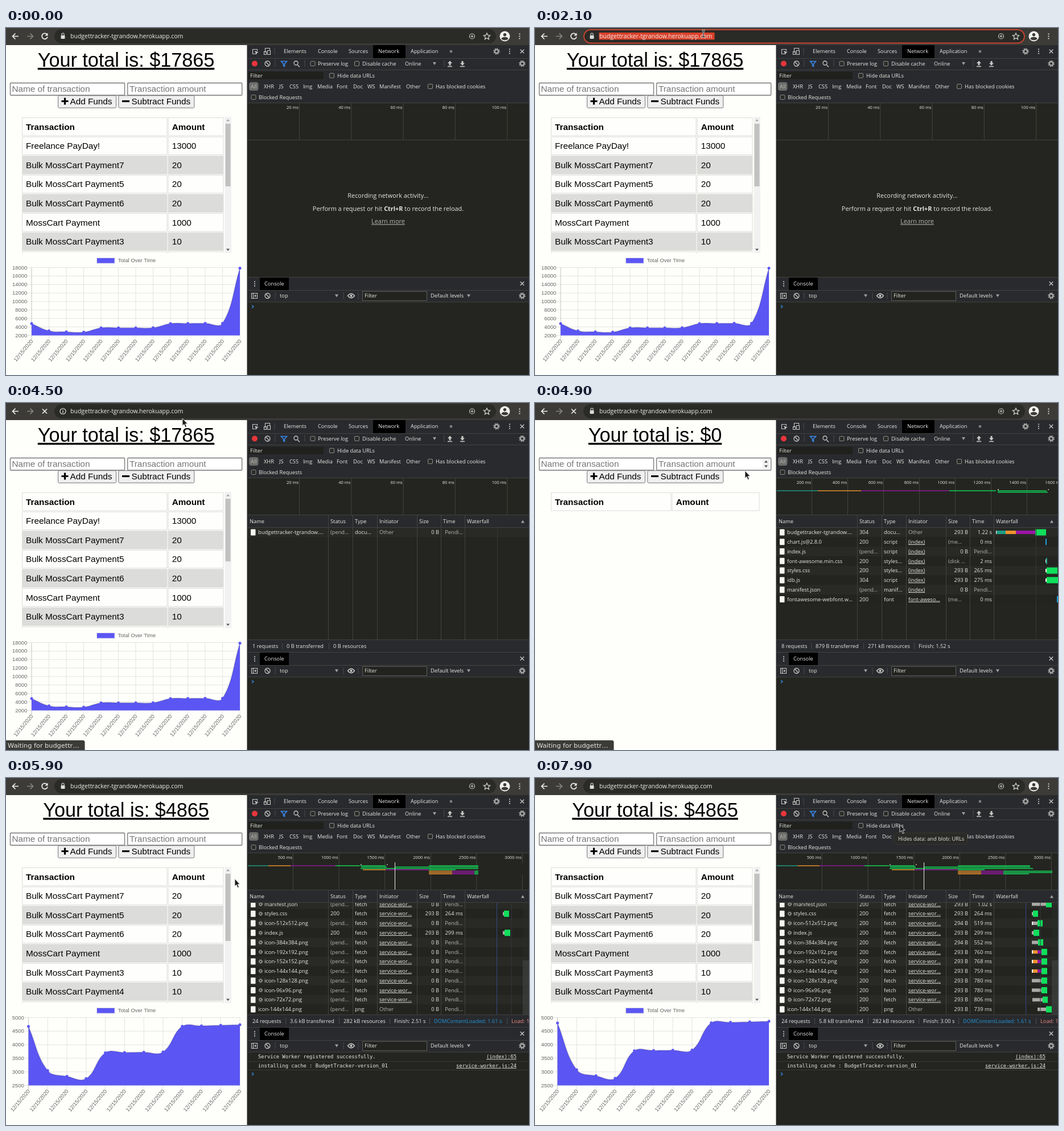
Recreate the animation shown at these times as an HTML page. Size 919 px wide and 609 px high, loop 8 s.

```html
<!DOCTYPE html>
<html lang="en">
<head>
<meta charset="utf-8">
<title>Budget tracker reload</title>
<style>
html, body { margin: 0; width: 100%; height: 100%; overflow: hidden; background: #242520; }
svg { display: block; width: 100%; height: 100%; }
text { font: 500 9.3px "Open Sans", "Noto Sans", sans-serif; fill: #e6e7e3; white-space: pre; }
.url { font-size: 10.5px; fill: #eee; }
.msg { font-size: 10.9px; text-anchor: middle; }
.tick { font-size: 7.5px; text-anchor: end; }
.dim { fill: #b4b5b1; }
.end { text-anchor: end; }
.link { text-decoration: underline; }
.mono { font: 8.8px "DejaVu Sans Mono", monospace; }
.wait { font: 11.3px "DejaVu Sans", sans-serif; }
.page { font: 15.3px "Liberation Sans", Arial, sans-serif; fill: #000; }
.hint { fill: #757575; }
.bold { font-weight: bold; }
.total { font-size: 34.2px; text-anchor: middle; text-decoration: underline; }
.axis { font: 9.5px "Liberation Sans", Arial, sans-serif; fill: #666; text-anchor: end; }
</style>
</head>
<body>
<svg viewBox="0 0 919 609" preserveAspectRatio="none">
  <defs>
    <clipPath id="rows"><path d="M424 218.500H919V415H424z"/></clipPath>
    <clipPath id="list"><path d="M0 150H397V395H0z"/></clipPath>
  </defs>
  <g id="base"></g>
  <g id="live"></g>
</svg>
<script>
const LOOP = 8000, STEP = 100;
const HOST = 'budgettracker-tgrandow';
const SHOP = 'MossCart';
const INK = '#c9cac6', EDGE = '#42433f', BLUE = '#5b56f3';
const HUES = { t: '#1d9e86', o: '#ef932d', p: '#9a16a6', g: '#10df5c', b: '#209fdf', a: '#a9aaa6', w: '#f4f4f0' };

const text = (x, mid, s, cls = '', size = 9.4) =>
  `<text x="${x}" y="${mid + size * .35}" class="${cls}">${s}</text>`;
const rect = (x, y, w, h, fill, more = '') =>
  `<rect x="${x}" y="${y}" width="${w}" height="${h}" fill="${fill}" ${more}/>`;
const line = (d, color = INK, w = 1.3, more = '') =>
  `<path d="${d}" fill="none" stroke="${color}" stroke-width="${w}" ${more}/>`;
const shape = (d, fill = INK) => `<path d="${d}" fill="${fill}"/>`;
const ring = (x, y, r, color = INK, w = 1.3, more = '') =>
  `<circle cx="${x}" cy="${y}" r="${r}" fill="none" stroke="${color}" stroke-width="${w}" ${more}/>`;
const dot = (x, y, r, fill = INK) => `<circle cx="${x}" cy="${y}" r="${r}" fill="${fill}"/>`;
const each = (list, fn) => list.map(fn).join('');

const gear = (x, y) => ring(x, y, 3.2, '#a5a6a4', 2.4) + ring(x, y, 5, '#a5a6a4', 1.5, 'stroke-dasharray="2 1.93"');
const dots = (x, y, gap, c) => each([-1, 0, 1], k => dot(x, y + k * gap, 1.1, c));
const cross = (x, y, r, c, w) => line(`M${x - r} ${y - r}l${2 * r} ${2 * r}m0 ${-2 * r}l${-2 * r} ${2 * r}`, c, w);
const stop = (x, y) => ring(x, y, 4.5) + line(`M${x - 3} ${y - 3}l6 6`);
const caret = (x, y) => shape(`M${x - 3} ${y - 2.5}h6l-3 5z`, '#a0a19f');
const box = (x, y) => rect(x - 4, y - 4, 8, 8, '#2b2c29', 'rx="1.5" stroke="#8d8e8a"');
const bars = ys => each(ys, ([x, y]) => line(`M${x} ${y - 6}v12`, '#4a4b4d', 1));

// "start c1end c2end ...": a letter picks the colour, a capital makes it tall
function segs(y, spec, thin, tall) {
  let [x, ...parts] = spec.split(' ');
  return each(parts, p => {
    const c = p[0], to = +p.slice(1), h = c < 'a' ? tall : thin, from = +x;
    x = to;
    return c === '_' ? '' : rect(from, y - h / 2, to - from, h, HUES[c.toLowerCase()]);
  });
}

function browser() {
  return rect(0, 0, 919, 30, '#3c3b37') + rect(85, 2, 776, 25, '#2a2a27', 'rx="12.500"')
    + line('M22 14.500H12M16.500 9.500l-5 5l5 5', '#eee', 1.7)
    + line('M37 14.500H47M42.500 9.500l5 5l-5 5', '#85857f', 1.7)
    + ring(819, 14.5, 4.5, '#c9c9c5', 1.2) + line('M816.500 14.500h5m-2.500-2.500v5', '#c9c9c5', 1.2)
    + line('M845 9l1.700 3.700 4 .4-3 2.700.9 4-3.600-2.100-3.600 2.100.9-4-3-2.700 4-.4z', '#d5d5d1', 1.2)
    + dot(876.5, 14.5, 9, '#f1f1ef') + dot(876.5, 11.8, 2.7, '#3c3b37')
    + shape('M870.500 19.500q0-3.800 6-3.800t6 3.800q-6 4-12 0z', '#3c3b37') + dots(902.5, 14.5, 4, '#eee');
}

function devtools() {
  const tabs = [[488, 'Elements'], [548, 'Console'], [602, 'Sources'], [654, 'Network'], [711, 'Application']];
  const types = [[453, 'XHR'], [480, 'JS'], [498, 'CSS'], [522, 'Img'], [547, 'Media'], [581, 'Font'],
    [610, 'Doc'], [635, 'WS'], [656, 'Manifest'], [703, 'Other']];
  return rect(423, 30, 496, 579, '#242520') + rect(424, 30, 495, 101, '#292a2d')
    + rect(645, 30, 57, 23, '#000') + line('M424 53.500H919M424 73.500H919M424 131.500H919M424 196.500H919', EDGE, 1)
    + line('M440 45.500h-6.500v-8h8v3', INK, 1.1) + shape('M437 40l7 2.700-3 1-1 3z')
    + line('M455.500 43v-7.500h8v3M453.500 41.500h4v5h-4zM459.500 39.500h5v7h-5z', INK, 1.1)
    + bars([[472, 41], [473, 62], [525, 62], [770, 62]])
    + each(tabs, ([x, s]) => text(x, 41, s)) + text(782, 40, '»', 'msg', 11)
    + gear(862, 41) + dots(885, 41, 3.7) + cross(907, 41, 3.3)
    + dot(437, 62.5, 5, '#e8363c') + stop(459.5, 62.5)
    + line('M483.500 58.500h10l-4 4.500v4.500l-2-1v-3.500z', '#3b86e8', 1.6)
    + ring(509.5, 61.5, 3.5) + line('M512 64.500l4 4')
    + box(539, 62.5) + text(548, 62.5, 'Preserve log') + box(616.5, 62.5) + text(626, 62.5, 'Disable cache')
    + text(701, 62.5, 'Online') + caret(753, 62.5)
    + shape('M780 57.500l4 4.500h-2.500v3.500h-3v-3.500h-2.500z') + shape('M802 66l4-4.500h-2.500v-3.500h-3v3.500h-2.500z')
    + line('M776 67.500h8M798 67.500h8') + gear(907, 62.5)
    + rect(426, 77, 132, 13, '#20211d') + text(429, 83.5, 'Filter') + box(572.5, 83.5) + text(582, 83.5, 'Hide data URLs')
    + rect(427, 95, 16.5, 15, '#6b6c69', 'rx="4"') + text(430, 102.5, 'All', 'dim')
    + each(types, ([x, s]) => text(x, 102.5, s)) + box(745.5, 102.5) + text(755, 102.5, 'Has blocked cookies')
    + box(435, 121.5) + text(444, 121.5, 'Blocked Requests')
    + rect(424, 437, 495, 44, '#292a2d') + rect(446, 438, 51, 22, '#000')
    + line('M424 437.500H919M424 460.500H919M424 481H919', EDGE, 1)
    + dots(437, 449, 3.7) + text(454, 448.5, 'Console') + cross(907, 448.5, 3.3)
    + line('M431.500 465.500h10v9h-10zM434.500 465v10', INK, 1.1) + shape('M437 467.500l3 2.500-3 2.500z')
    + stop(459.5, 470) + text(481, 470, 'top') + caret(581, 470) + bars([[473, 470], [593, 470], [619, 470]])
    + line('M600.500 470q6-7.500 12 0q-6 7.500-12 0z') + dot(606.5, 470, 2)
    + rect(626.5, 462.5, 113, 16, '#22231f', 'stroke="#5d5e5a"') + text(630, 470, 'Filter')
    + text(746, 470, 'Default levels') + caret(813, 470) + gear(907, 470);
}

function addressBar(t) {
  const busy = t >= 3200 && t < 5300, info = t >= 3200 && t < 4700;
  let s = busy ? cross(68, 14.5, 4, '#eee', 1.7)
    : line('M72.300 11.500a5 5 0 1 0 .7 4', '#eee', 1.7) + shape('M73.500 8.500v5h-5z', '#eee');
  if (t >= 1900 && t < 3200) {
    s += rect(86, 3, 774, 23.5, 'none', `rx="12" stroke="#c7432f" stroke-width="2" opacity="${Math.min(1, (t - 1800) / 300)}"`)
      + rect(112.5, 8, 203, 12.5, '#da412a');
  }
  s += info ? ring(100, 14.5, 5, '#ddd', 1.2) + line('M100 13.500v4M100 11v1.300', '#ddd', 1.4)
    : rect(96.5, 13, 7, 6, '#ddd', 'rx="1"') + line('M98 13v-2a2 2 0 0 1 4 0v2', '#ddd', 1.2);
  return s + text(113, 14.5, HOST + '.herokuapp.com', 'url', 10.6);
}

function form(total, spin) {
  const field = x => rect(x, 96.5, 201, 21.5, '#fff', 'stroke="#767676" stroke-width="1.300" rx="1"');
  const button = (x, w) => rect(x, 118.7, w, 21.5, '#efefef', 'stroke="#767676" rx="2"');
  return rect(0, 30, 423.5, 579, '#fefefb') + text(211, 55.9, 'Your total is: $' + total, 'page total', 34.2)
    + field(7.5) + field(213.7) + text(10.5, 106.7, 'Name of transaction', 'page hint', 15.3)
    + text(217, 106.7, 'Transaction amount', 'page hint', 15.3)
    + (spin ? rect(400, 98, 12, 18, '#efefef') + shape('M403 104.500l3-3.500 3 3.500zM403 109.500l3 3.500 3-3.500z', '#444') : '')
    + button(91.5, 102) + button(197.8, 133)
    + line('M97.500 128.500h12m-6-6v12', '#000', 3.2) + line('M204 128.500h13', '#000', 3.2)
    + text(112.5, 129, 'Add Funds', 'page', 15.3) + text(220.5, 129, 'Subtract Funds', 'page', 15.3);
}

function table(rows, split, right, thumb) {
  const cells = [['Transaction', 'Amount'], ...rows];
  let s = each(cells, ([a, b], i) => {
    const y = 157.5 + i * 33.6, fill = i && i % 2 === 0 ? '#dcdcda' : '#fefefc', cls = i ? 'page' : 'page bold';
    const cell = (x, to) => rect(x, y, to - x, 31.5, fill, 'stroke="#dcdcda"');
    return cell(28.5, split) + cell(split + 2, right)
      + text(35, y + 15.7, a, cls, 15.3) + text(split + 8.7, y + 15.7, b, cls, 15.3);
  });
  if (thumb) s += rect(384.5, 156, 11.5, 239, '#f1f1f1') + rect(385.5, 168, 9, thumb, '#c1c1c1')
    + shape('M387 163.500h6l-3-3.500z', '#a3a3a3') + shape('M387 387.500h6l-3 3.500z', '#505050');
  return `<g clip-path="url(#list)">${s}</g>`;
}

const TOP = 420.5, BASE = 539.5, RIGHT = 411;
function chart(values, left, lo, hi, step, grow) {
  const n = values.length;
  const pts = values.map((v, i) => [left + (RIGHT - left) * i / (n - 1), BASE - (v - lo) / (hi - lo) * (BASE - TOP)]);
  const put = ([x, y]) => `${x.toFixed(2)} ${(BASE - (BASE - y) * grow).toFixed(2)}`;
  const cap = ([x, y]) => [Math.min(RIGHT, Math.max(left, x)), Math.min(BASE, Math.max(TOP, y))];
  const handles = pts.map((p, i) => {
    const a = pts[i - 1] || p, b = pts[i + 1] || p;
    const d1 = Math.hypot(p[0] - a[0], p[1] - a[1]), d2 = Math.hypot(b[0] - p[0], b[1] - p[1]);
    const at = k => cap([p[0] + k * (b[0] - a[0]), p[1] + k * (b[1] - a[1])]);
    return [at(-.4 * d1 / (d1 + d2)), at(.4 * d2 / (d1 + d2))];
  });
  const curve = 'M' + put(pts[0]) + each(pts.slice(1), (p, i) =>
    `C${put(handles[i][1])} ${put(handles[i + 1][0])} ${put(p)}`);
  let s = rect(159.5, 403.5, 31.5, 9.5, BLUE, 'stroke="#d5d5ee"') + text(263, 407.5, 'Total Over Time', 'axis', 9.5);
  for (let v = lo; v <= hi; v += step) {
    const y = BASE - (v - lo) / (hi - lo) * (BASE - TOP);
    s += line(`M${left - 7} ${y}H${RIGHT}`, '#e3e3e1', 1) + text(left - 7.7, y - .3, v, 'axis', 9.5);
  }
  s += each(pts, ([x], i) => line(`M${x} ${TOP}V547`, i ? '#e3e3e1' : '#c4c4c2', 1)
    + `<text class="axis" transform="translate(${x + .6} 547.700) rotate(-50)" y="3.400">12/15/2020</text>`);
  return s + shape(`${curve}L${RIGHT} ${BASE}L${left} ${BASE}z`, BLUE) + line(curve, '#0000001a', 2.3)
    + each(pts, p => { const [x, y] = put(p).split(' '); return dot(x, y, 2.5, BLUE); });
}

const totals = [4800, 3080, 2855, 2765, 3775, 3785, 3795, 3805, 4805, 4825, 4845, 4865];
const bulk = (n, sum) => [`Bulk ${SHOP} Payment${n}`, sum];
const spent = [bulk(7, 20), bulk(5, 20), bulk(6, 20), [SHOP + ' Payment', 1000], bulk(3, 10), bulk(4, 10), ['', '']];

function page(t) {
  if (t < 4800) {
    return form(17865) + table([['Freelance PayDay!', 13000], ...spent.slice(0, 5), ['', '']], 283, 382, 110)
      + chart([...totals, 17865], 45, 2000, 18000, 2000, 1);
  }
  if (t < 5300) return form(0, t < 5000) + table([], 239, 394);
  const k = Math.min(1, Math.max(0, (t - 5384) / 1000));
  return form(4865) + table(spent, 283, 382, 118) + chart(totals, 39.5, 2500, 5000, 500, 1 - (1 - k) ** 4);
}

// name | status | type | initiator | size | time | waterfall
const docWait = HOST + '.…|(pend…|docu…|Other|0 B|Pendi…|0';
const loading = [
  HOST + '.…|304|docu…|Other|293 B|1.22 s|810 w811.5 t827 o845 p879 G898',
  'chart.js@2.8.0|200|script|(index)|(me…|0 ms|897 B899',
  'index.js|(pend…|script|(index)|0 B|Pendi…|0',
  'font-awesome.min.css|200|styles…|(index)|(disk …|2 ms|897 w898 T900',
  'styles.css|200|styles…|(index)|293 B|265 ms|897 w899 G918',
  'idb.js|304|script|(index)|293 B|275 ms|897 w899 G919',
  'manifest.json|(pend…|manif…|(index)|0 B|Pendi…|0',
  'fontawesome-webfont.w…|200|font|font-aweso…|(me…|0 ms|917 B919'];
const icon = n => `icon-${n}x${n}.png`;
const sizes = [512, 384, 192, 152, 144, 128, 96, 72];
const fetching = ['styles.css', 'index.js', 'idb.js', 'manifest.json', ...sizes.map(icon)]
  .map(s => s + '|(pend…|fetch|service-wor…|0 B|Pendi…|0');
const mixed = '873 w875 o883 p890 G900';
const fetched = [
  ['manifest.json', '1.02 s', '873 a898 G908'], ['styles.css', '264 ms', '873 a875 G884'],
  [icon(512), '519 ms', '873 w875 a883 G892', 294], ['index.js', '299 ms', '873 a876 G886'],
  [icon(384), '552 ms', '873 a884 G893', 294], [icon(192), '760 ms', mixed], [icon(152), '768 ms', mixed],
  [icon(144), '759 ms', mixed], [icon(128), '780 ms', '873 a890 G900'], [icon(96), '780 ms', '873 a890 G900'],
  [icon(72), '806 ms', '874 a892 G901'], [icon(144), '739 ms', '883 a898 G908']];

function settled(t) {
  return fetched.map(([name, time, wf, size = 293], i) => {
    const ms = parseFloat(time) * (time.endsWith('ms') ? 1 : 1000);
    const open = t < Math.min(6400, 5560 + ms);
    const kind = i < 11 ? 'fetch|service-wor…' : 'png|Other';
    return open ? `${name}|(pend…|${kind}|0 B|Pendi…|0` : `${name}|200|${kind}|${size} B|${time}|${wf}`;
  });
}

function row(spec, y, odd) {
  const [name, status, type, from, size, time, wf] = spec.split('|');
  const sw = type === 'fetch', grey = s => /^\(|^Pend|^Other/.test(s) ? 'dim' : '';
  return rect(424, y - 8.4, 495, 16.8, odd ? '#292a26' : '#232420') + rect(430, y - 5.5, 8.5, 11, '#f5f5f2', 'rx="1"')
    + (sw ? ring(447.5, y, 2, INK, 1) + ring(447.5, y, 3.3, INK, 1, 'stroke-dasharray="1.300 1.300"') : '')
    + text(sw ? 454 : 443, y, name) + text(570, y, status, grey(status)) + text(613, y, type)
    + text(656, y, from, from === 'Other' ? 'dim' : 'link')
    + (size[0] === '(' ? text(726, y, size, 'dim') : text(761, y, size, 'end'))
    + text(803, y, time, 'end ' + grey(time)) + segs(y, wf, 6, 11);
}

function grid(rows, first, marks, thumb) {
  const heads = [[428, 'Name'], [570, 'Status'], [613, 'Type'], [656, 'Initiator'], [726, 'Size'], [768, 'Time'], [810, 'Waterfall']];
  const cols = each([566.5, 609.5, 652.5, 722.5, 764.5, 806.5], x => line(`M${x} 197V415`, EDGE, 1));
  const body = each(rows, (s, i) => row(s, first + i * 16.78, i % 2 === 0));
  return `<g clip-path="url(#rows)">${body}${each(marks, ([x, c]) => line(`M${x} 218V415`, c, 1))}`
    + (thumb ? rect(908, 218, 11, 197, '#2b2c29', 'opacity=".5"') + rect(908, thumb, 11, 415 - thumb, '#55565a', 'opacity=".35"') : '') + '</g>'
    + rect(424, 197, 495, 21, '#292a2d') + each(heads, ([x, s]) => text(x, 207.5, s)) + shape('M905 210.500h6l-3-5z', '#a0a19f')
    + cols + line('M424 218.500H919M424 415.500H919', EDGE, 1);
}

function footer(items) {
  const tint = s => s.startsWith('DOM') ? 'style="fill:#2196dc"' : s.startsWith('Load') ? 'style="fill:#f08a86"' : '';
  return rect(424, 416, 495, 21, '#292a2d') + each(items, ([x, s], i) =>
    `<g>${i ? line(`M${x - 7.5} 421v11`, '#4a4b4d', 1) : ''}<text x="${x}" y="429.800" ${tint(s)}>${s}</text></g>`);
}

function ruler(first, gap, ms, lines) {
  let s = '';
  for (let i = 0, x = first; x < 950; i++, x += gap) {
    s += line(`M${x} 132V196`, EDGE, 1) + text(x - 1.5, 139.5, (i + 1) * ms + ' ms', 'tick', 7.6);
  }
  return s + each(lines, ([y, spec]) => segs(y, spec, 1.4, 2));
}

function network(t) {
  if (t < 3200) {
    return ruler(515.5, 91.3, 20, []) + text(671.5, 294.5, 'Recording network activity…', 'msg', 11)
      + text(671.5, 317, 'Perform a request or hit <tspan class="bold">Ctrl+R</tspan> to record the reload.', 'msg', 11)
      + text(671.5, 339.5, 'Learn more', 'msg link dim', 11);
  }
  if (t < 4700) {
    return ruler(515.5, 91.3, 20, []) + grid([docWait], 227, [[863.5, '#363733']])
      + footer([[433, '1 requests'], [493, '0 B transferred'], [575, '0 B resources']]);
  }
  if (t < 5200) {
    return ruler(486.5, 63, 200, [[154, '425 t497 o573 p728 g810'], [154.2, '813 g899'], [156.6, '813 g901'], [152, '813 w815 _901.5 w903']])
      + grid(loading, 227, [[880.5, '#363733']])
      + footer([[433, '8 requests'], [493, '879 B transferred'], [585, '271 kB resources'], [674, 'Finish: 1.52 s']]);
  }
  const late = t >= 5700, k = Math.min(1, Math.max(0, (t - 5400) / 1000));
  const foot = footer([[433, (late ? 24 : 23) + ' requests'], [499, (1.4 + 4.4 * k).toFixed(1) + ' kB transferred'],
    [593, (late ? 282 : 277) + ' kB resources'], [682, `Finish: ${(2.02 + .98 * k).toFixed(2)} s`],
    [752, 'DOMContentLoaded: 1.61 s'], [888, 'Load: 1.63 s']]);
  if (!late) {
    return ruler(524.5, 100.8, 500, [[154, '425 t472 o519 p618 g671'], [154, '673 g729'], [156.3, '674 g730 _749 g824'],
      [158.8, '673 g832'], [152, '673 w674.5 _730 w731.5']]) + line('M748.500 148V196', '#ededed', 1)
      + grid(fetching, 221.4, [[888, '#33497f']], 317) + foot;
  }
  const edge = 425 + 484 * (2.02 + .98 * k) / 3;
  const lanes = [[154, '425 t461 o500 p579 g622'], [154, '623 g667 _743 g870'], [156.3, '624 g669 _684 g870'],
    [158.8, '623 g875'], [161, '627 o667 p743 g790'], [163.5, '743 o784 p823 g909'],
    [165.9, '743 o784 p823 g909'], [168.3, '743 o784 p823 g868'], [152, '623 w624.5 _669 w670.5']];
  return ruler(504.5, 80.6, 500, lanes) + (k < 1 ? rect(edge, 150, 919 - edge, 20, '#242520') : '')
    + line('M683.500 148V196', '#ededed', 1)
    + grid(settled(t), 221.4, [[862.5, '#33497f'], [888, '#33363a']], 320) + foot;
}

function consoleLog(t) {
  const prompt = y => line(`M432 ${y - 2.5}l3 2.500-3 2.500`, '#3187e0', 1.4);
  if (t < 5300) return prompt(489);
  return text(443, 489.3, 'Service Worker registered successfully.', 'mono', 8.8) + text(897, 489.3, '(index):65', 'mono end link', 8.8)
    + text(443, 504.8, 'installing cache : BudgetTracker-version_01', 'mono', 8.8)
    + text(897, 504.8, 'service-worker.js:24', 'mono end link', 8.8)
    + line('M424 497.500H919M424 512.500H919', '#383934', 1) + prompt(519.5);
}

// [time, x, y] stops of the pointer
const moves = [[900, 196, 108], [1800, 296, 10], [3200, 296, 10], [4500, 310, 27], [4900, 369, 119], [5400, 402, 177],
  [6500, 402, 177], [6600, 402, 170], [7200, 402, 170], [7700, 641, 82], [LOOP, 641, 82]];
function pointer(t) {
  if (t < 1000 || (t >= 3200 && t < 4500)) return '';
  const i = moves.findIndex(m => m[0] > t), [t0, x0, y0] = moves[i - 1], [t1, x1, y1] = moves[i];
  const u = (t - t0) / (t1 - t0), x = x0 + (x1 - x0) * u, y = y0 + (y1 - y0) * u;
  if (t < 4500 && y < 26) {
    const d = `M${x - 2.5} ${y - 6}q2.500 0 2.500 1.500v9q0 1.500-2.500 1.500m5-12q-2.500 0-2.500 1.500m0 9q0 1.500 2.500 1.500`;
    return line(d, '#fff', 2.6) + line(d, '#111', 1.2);
  }
  return `<path d="M${x} ${y}v13l2.900-2.700 2.300 5.300 2.200-1-2.300-5h3.900z" fill="#1b1b1b" stroke="#f2f2f2" stroke-width=".8"/>`;
}

function overlay(t) {
  let s = '';
  if (t >= 3500 && t < 5200) {
    s += shape('M0 592H135q3.500 0 3.500 3.500V609H0z', '#3b3b38') + text(3, 600.8, 'Waiting for budgettr…', 'wait', 11.3);
  }
  if (t >= 7800) {
    s += `<g opacity="${t < 7900 ? .5 : 1}">${rect(631.5, 96.5, 128, 20, '#2a2a27', 'rx="3" stroke="#363632"')}${text(638, 106.5, 'Hides data: and blob: URLs')}</g>`;
  }
  return s + pointer(t);
}

const live = document.getElementById('live');
document.getElementById('base').innerHTML = browser() + devtools();
const start = performance.now();
let shown = -1;
function tick(now) {
  const t = Math.floor(Math.max(0, now - start) % LOOP / STEP) * STEP;
  if (t !== shown) {
    live.innerHTML = addressBar(t) + page(t) + network(t) + consoleLog(t) + overlay(t);
    shown = t;
  }
  requestAnimationFrame(tick);
}
tick(start);
</script>
</body>
</html>
```
